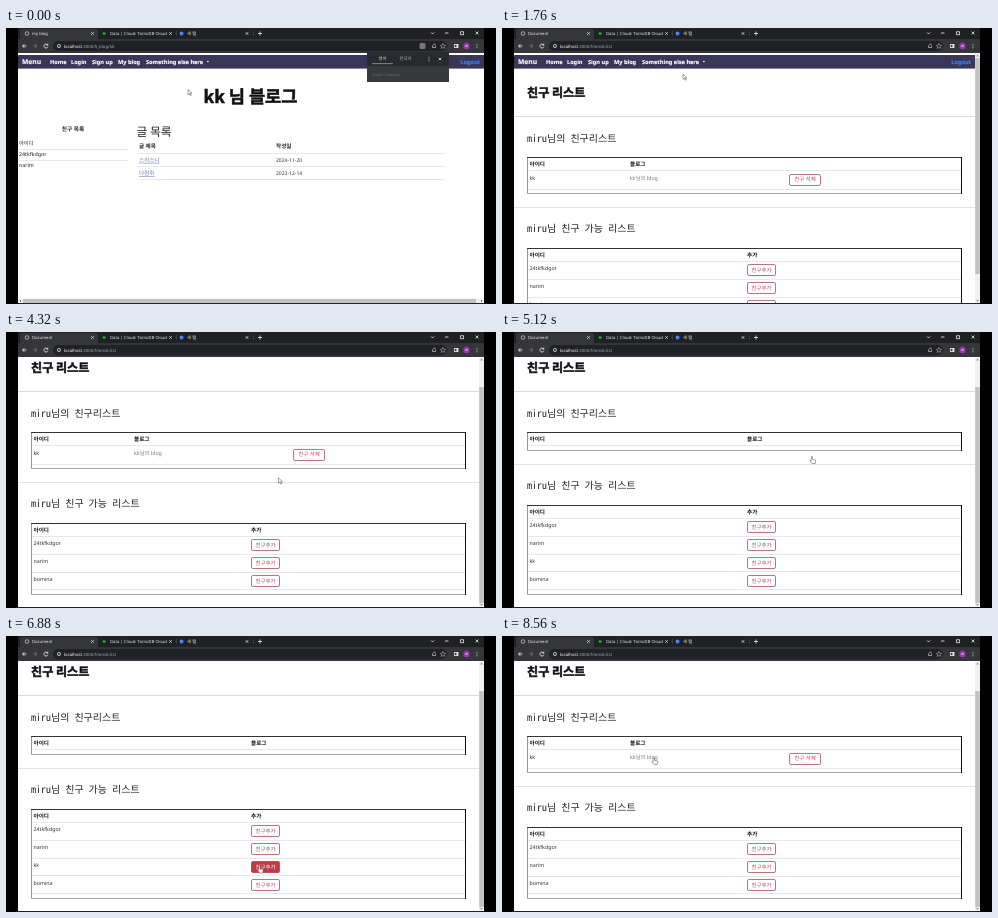
An HTML page for the animation above (8640 ms loop, 490 by 276 pixels).

```html
<!DOCTYPE html>
<html>
<head>
<meta charset="utf-8">
<style>
html, body { margin: 0; width: 100%; height: 100%; overflow: hidden; background: #000 }
svg { display: block; width: 490px; height: 276px; text-rendering: geometricPrecision; font-family: "Noto Sans", "Noto Sans CJK KR", "Noto Sans CJK", sans-serif }
text { white-space: pre }
.heavy { font-family: "Noto Sans CJK KR", "Noto Sans CJK", "Noto Sans", sans-serif; font-weight: 900 }
.title { stroke: #111; stroke-width: .5 }
.nav { font-weight: 900; stroke: currentColor; stroke-width: .15 }
.mono { font-family: "Noto Sans Mono CJK KR", "Noto Sans Mono", "Noto Sans CJK KR", monospace }
.bold { font-weight: 600 }
.thin { font-family: "Noto Sans CJK KR", "Noto Sans CJK", sans-serif; font-weight: 300 }
.link { text-decoration: underline }
.btn rect { fill: #fff; stroke: #ad5058; stroke-width: .8 }
.btn text { fill: #a0525a }
.btn.over rect { fill: #bd3b45; stroke: #bd3b45 }
.btn.over text { fill: #fff }
</style>
</head>
<body>
<svg id="stage" viewBox="0 0 490 276"></svg>
<script>
const LOOP = 8640, SCROLL = 29;
const me = 'miru', pal = 'kk', others = ['24tkfkdgor', 'narim', 'bomina'];

// Drawing helpers; text is placed by its left edge and vertical middle.
const text = (x, y, s, size = 5.3, fill = '#333', cls = '', anchor = 'start') =>
  `<text x="${x}" y="${y + size * .36}" font-size="${size}" fill="${fill}" color="${fill}" class="${cls}" text-anchor="${anchor}">${s}</text>`;
const rect = (x, y, w, h, fill, more = '') =>
  `<rect x="${x}" y="${y}" width="${w}" height="${h}" fill="${fill}" ${more}/>`;
// Rules snap to whole pixels so they stay crisp.
const hline = (x1, x2, y, color = '#e6e8ea') => rect(x1, Math.floor(y), x2 - x1, 1, color);
const vline = (x, y1, y2, color) => rect(x, y1, 1, y2 - y1, color);
const path = (d, color = '#eee', w = .8) => `<path d="${d}" fill="none" stroke="${color}" stroke-width="${w}"/>`;
const dot = (x, y, r, fill) => `<circle cx="${x}" cy="${y}" r="${r}" fill="${fill}"/>`;
const ring = (x, y, r, color = '#ddd') => `<circle cx="${x}" cy="${y}" r="${r}" fill="none" stroke="${color}" stroke-width=".7"/>`;
const cross = (x, y, r = 1.4) => path(`M${x - r} ${y - r}l${2 * r} ${2 * r}m0 ${-2 * r}l${-2 * r} ${2 * r}`);
const dots = (x, y) => [-1.7, 0, 1.7].map(d => dot(x, y + d, .5, '#ddd')).join('');
const group = (id, body) => `<g id="${id}">${body}</g>`;

function button(x, y, w, label) {
  const top = Math.round(y) - 6;
  return `<g class="btn" data-box="${x},${top},${w},12">${rect(x + .5, top + .5, w - 1, 11, '#fff', 'rx="1.5"')}` +
    text(x + w / 2, y, label, 5.5, '', '', 'middle') + '</g>';
}

function navbar(right) {
  const items = [[44, 'Home'], [65, 'Login'], [86, 'Sign up'], [112, 'My blog'], [140, 'Something else here']];
  return rect(12, 27, right - 12, 13.6, '#393657') +
    text(16, 33.8, 'Menu', 6.7, '#fff', 'nav') +
    items.map(([x, s]) => text(x, 33.8, s, 5.6, '#fff', 'nav')).join('') +
    '<path d="M200.6 33h2.6l-1.3 1.5z" fill="#fff"/>' +
    text(right - 4, 33.8, 'Logout', 5.6, '#3f80f5', 'nav', 'end');
}

function chrome() {
  return rect(12, 0, 466, 11, '#202124') + rect(12, 11, 466, 14, '#35363a') +
    rect(14, 1, 78, 11, '#35363a', 'rx="2"') +
    ring(21, 5.5, 1.8) + dot(98, 5.5, 1.6, '#2e9c55') + dot(175.5, 5.5, 2, '#4a86e8') +
    text(104, 5.5, 'Data | Cloud: TarnoDB Cloud', 4.2, '#eee') + text(181, 5.5, '새 탭', 4.4, '#eee') +
    [86.5, 164.5, 241].map(x => cross(x, 5.5, 1.2)).join('') +
    rect(170, 3, .5, 5, '#555') + rect(247, 3, .5, 5, '#555') +
    path('M252 5.5h4m-2 -2v4') + path('M425 4.5l1.5 1.5 1.5 -1.5M439 5h3.5M454.5 3.7h3v3h-3z') + cross(471, 5) +
    path('M20.5 18h-4m2 -2l-2 2 2 2') + path('M27 18h4m-2 -2l2 2 -2 2', '#777') +
    path('M41.5 16.8a2 2 0 1 0 .3 2M41.8 15.5v1.7h-1.7') +
    rect(47, 13, 394, 10, '#202124', 'rx="5"') + ring(53, 18, 1.7) + rect(52.7, 17.7, .6, 1.4, '#ddd') +
    path('M426.5 17.5v2h3v-2M427 17.3q.5 -1.5 2.5 -1.2', '#bbb') +
    path('M437 15.5l.8 1.7 1.8 .2 -1.3 1.2 .4 1.8 -1.7 -.9 -1.7 .9 .4 -1.8 -1.3 -1.2 1.8 -.2z', '#ccc', .5) +
    rect(448, 16, 4.4, 4, '#eee') + rect(448.7, 16.8, 1.8, 2.4, '#35363a') +
    dot(460.5, 18, 3.2, '#9b35b8') + text(460.5, 18, 'm', 3.6, '#fff', '', 'middle') + dots(471, 18);
}

const address = path => `<text x="58" y="19.5" font-size="4.3" fill="#a4a9ae"><tspan fill="#fff">localhost</tspan>:3000/${path}</text>`;

function blogPage() {
  const rows = [['스리스니', '2024-11-20'], ['다람쥐', '2023-12-14']];
  return navbar(478) + text(244.5, 69, pal + ' 님 블로그', 17.6, '#111', 'heavy title', 'middle') +
    text(67, 101, '친구 목록', 5.7, '#222', 'bold', 'middle') +
    ['아이디', others[0], others[1]].map((s, i) => text(13, 115 + 11 * i, s, 5.3, '#222') + (i < 2 ? hline(13, 122, 121 + 11 * i) : '')).join('') +
    text(130.5, 104, '글 목록', 11.8, '#222', 'thin') +
    text(133, 118.3, '글 제목', 5.6, '#222', 'bold') + text(270, 118.3, '작성일', 5.6, '#222', 'bold') + hline(131, 439, 125) +
    rows.map(([a, b], i) => text(133, 131.8 + 13.3 * i, a, 5.6, '#6c7fae', 'link') +
      text(270, 131.8 + 13.3 * i, b, 5, '#333') + hline(131, 439, 138 + 13.2 * i)).join('') +
    rect(12, 270.5, 466, 5, '#f1f1f1') + rect(17, 271, 453, 4, '#c1c1c1') +
    path('M15 272l-1 1 1 1M475 272l1 1 -1 1', '#555');
}

const frame = (top, bottom) => vline(25, top, bottom, '#999') + hline(25, 460, bottom - 1, '#aaa') +
  hline(25, 460, top, '#333') + vline(459, top, bottom, '#111');

function friendsPage(linked) {
  const top = linked ? 220 : 202, end = linked ? 166 : 148;
  const people = linked ? others : [others[0], others[1], pal, others[2]];
  const head = (y, x, label) => text(27.5, y + 6.8, '아이디', 5.6, '#111', 'bold') +
    text(x, y + 6.8, label, 5.6, '#111', 'bold') + hline(26, 459, y + 13.3);
  return navbar(473) + text(25, 64.3, '친구 리스트', 12.1, '#111', 'heavy title') + hline(12, 473, 88, '#ddd') +
    text(25, 110, me + '님의 친구리스트', 10, '#222', 'mono') +
    head(129, linked ? 128 : 245, '블로그') +
    (linked ? text(27.5, 150.5, pal) + text(128, 150.5, pal + '님의 blog', 5.3, '#6f7896') +
      button(287, 151.5, 32, '친구 삭제') + hline(26, 459, 161) : '') +
    frame(129, end) + hline(12, 473, end + 13.5, '#e4e4e4') +
    text(25, top - 19.5, me + '님 친구 가능 리스트', 10, '#222', 'mono') +
    head(top, 245, '추가') +
    people.map((name, i) => {
      const y = top + 22.2 + 17.8 * i;
      return text(27.5, y - 2, name) + button(245, y, 29, '친구추가') + hline(26, 459, y + 9.1);
    }).join('') + frame(top, 292);
}

const popup = rect(361, 24, 82, 30, '#292a2d', 'rx="1"') + rect(361, 38, 82, 16, '#38393d') +
  text(376.5, 30.8, '영어', 4.4, '#ddd', '', 'middle') + text(399.5, 30.8, '한국어', 4.4, '#bbb', '', 'middle') +
  rect(366, 35.4, 21, .7, '#8ab4f8') + dots(423, 31) + cross(434, 31, 1.2) + text(366, 46.5, 'Quolin Translate', 3.7, '#6c6d70');

const menu = rect(137.5, 40.5, 51, 43, '#fff', 'stroke="#bbb" stroke-width=".8" rx="1"') +
  text(142, 49, '친구목록', 5, '#222', 'heavy') + text(142, 59, '블로그기능 추가', 5, '#222', 'heavy') +
  hline(138, 188, 67, '#ccc') + text(142, 75, '전체회원', 5, '#222', 'heavy');

const status = rect(12, 268.7, 49, 7.3, '#292a2d') + text(14, 272.3, `localhost:3000/4_blog/${pal}#`, 3.7, '#ccc');

const scrollbar = rect(473, 25, 5, 250, '#f1f1f1') + path('M474.3 28.5l1.2 -1.2 1.2 1.2M474.3 272l1.2 1.2 1.2 -1.2', '#555') +
  rect(473.2, 30, 4.6, 216, '#c1c1c1', 'id="thumb"');

const arrow = '<path d="M0 0v5.4l1.4 -1.2 .9 2 .8 -.4 -.9 -1.9h1.8z" fill="#fff" stroke="#444" stroke-width=".5"/>';
const hand = '<path d="M.2 .6q.7 -1 1.3 0v2.7l2.6 .5q.8 .3 .6 1.2l-.5 2.6h-3.1l-2.3 -2.8q.1 -.9 1.4 .1z" fill="#fff" stroke="#444" stroke-width=".5"/>';

const $ = id => document.getElementById(id);
$('stage').innerHTML = '<clipPath id="view"><rect x="12" y="25" width="466" height="250"/></clipPath>' +
  rect(12, 0, 466, 276, '#222') + rect(12, 25, 466, 250, '#fff') +
  '<g clip-path="url(#view)">' + group('blog', blogPage()) + group('list', group('linked', friendsPage(true)) + group('unlinked', friendsPage(false))) + '</g>' +
  group('bar', scrollbar) + chrome() +
  group('blogTab', text(26, 5.5, 'my blog', 4.2, '#eee') + address('5_blog/' + pal) +
    rect(413.5, 15, 6, 6, '#777', 'rx="1"')) +
  group('listTab', text(26, 5.5, 'Document', 4.2, '#eee') + address('friends-list')) +
  group('popup', popup) + group('menu', menu) + group('status', status) +
  group('cursor', group('arrow', arrow) + group('hand', hand));

// Pointer stops: time, x, y
const stops = [
  [0, 182, 61.5], [80, 182, 61.5], [560, 172, 35], [880, 185, 42], [960, 185, 42], [1200, 153, 49], [1360, 153, 49],
  [1760, 181, 46], [1960, 181, 46], [2640, 182.3, 76.5], [2840, 182.3, 76.5], [3160, 216, 150], [3440, 196, 196],
  [3800, 196, 196], [4640, 309, 122], [4760, 309, 122], [5000, 309, 124], [5560, 309, 124], [6400, 252.5, 229.5],
  [7120, 252.5, 229.5], [7680, 328, 186], [7720, 328, 186], [8160, 300, 124], [8560, 151, 121], [LOOP, 151, 121]];

const ease = p => p * p * (3 - 2 * p);
const ramp = (t, a, b) => ease(Math.min(1, Math.max(0, (t - a) / (b - a))));

function pointer(t) {
  const i = stops.findIndex(s => s[0] > t);
  const [t0, x0, y0] = stops[i - 1], [t1, x1, y1] = stops[i];
  const p = ramp(t, t0, t1);
  return [x0 + (x1 - x0) * p, y0 + (y1 - y0) * p];
}

const show = (id, on) => $(id).setAttribute('display', on ? 'inline' : 'none');

function draw(t) {
  const onBlog = t < 1360, linked = t < 4800 || t >= 7120;
  const scroll = SCROLL * ramp(t, 1960, 2640);
  const [x, y] = pointer(t);
  const inside = (bx, by, w, h) => x >= bx && x <= bx + w && y >= by && y <= by + h;

  ['blog', 'blogTab'].forEach(id => show(id, onBlog));
  ['list', 'listTab', 'bar'].forEach(id => show(id, !onBlog));
  show('linked', linked);
  show('unlinked', !linked);
  show('popup', t < 400);
  show('menu', t >= 560 && onBlog);
  show('status', t >= 480 && t < 1120);
  $('list').setAttribute('transform', `translate(0 ${-scroll})`);
  $('thumb').setAttribute('y', 30 + 25 * scroll / SCROLL);

  let over = onBlog && t > 1040 || t > 4700 && t < 5640 || !onBlog && linked && inside(128, 147 - scroll, 28, 8);
  document.querySelectorAll('.btn').forEach(b => {
    const [bx, by, w, h] = b.dataset.box.split(',').map(Number);
    const active = !onBlog && (b.parentNode.id === 'linked') === linked && inside(bx, by - scroll, w, h);
    b.classList.toggle('over', active);
    over = over || active;
  });
  show('hand', over);
  show('arrow', !over);
  $('cursor').setAttribute('transform', `translate(${x} ${y})`);
}

const start = performance.now();
function tick() {
  draw((performance.now() - start) % LOOP);
  requestAnimationFrame(tick);
}
tick();
</script>
</body>
</html>
```
